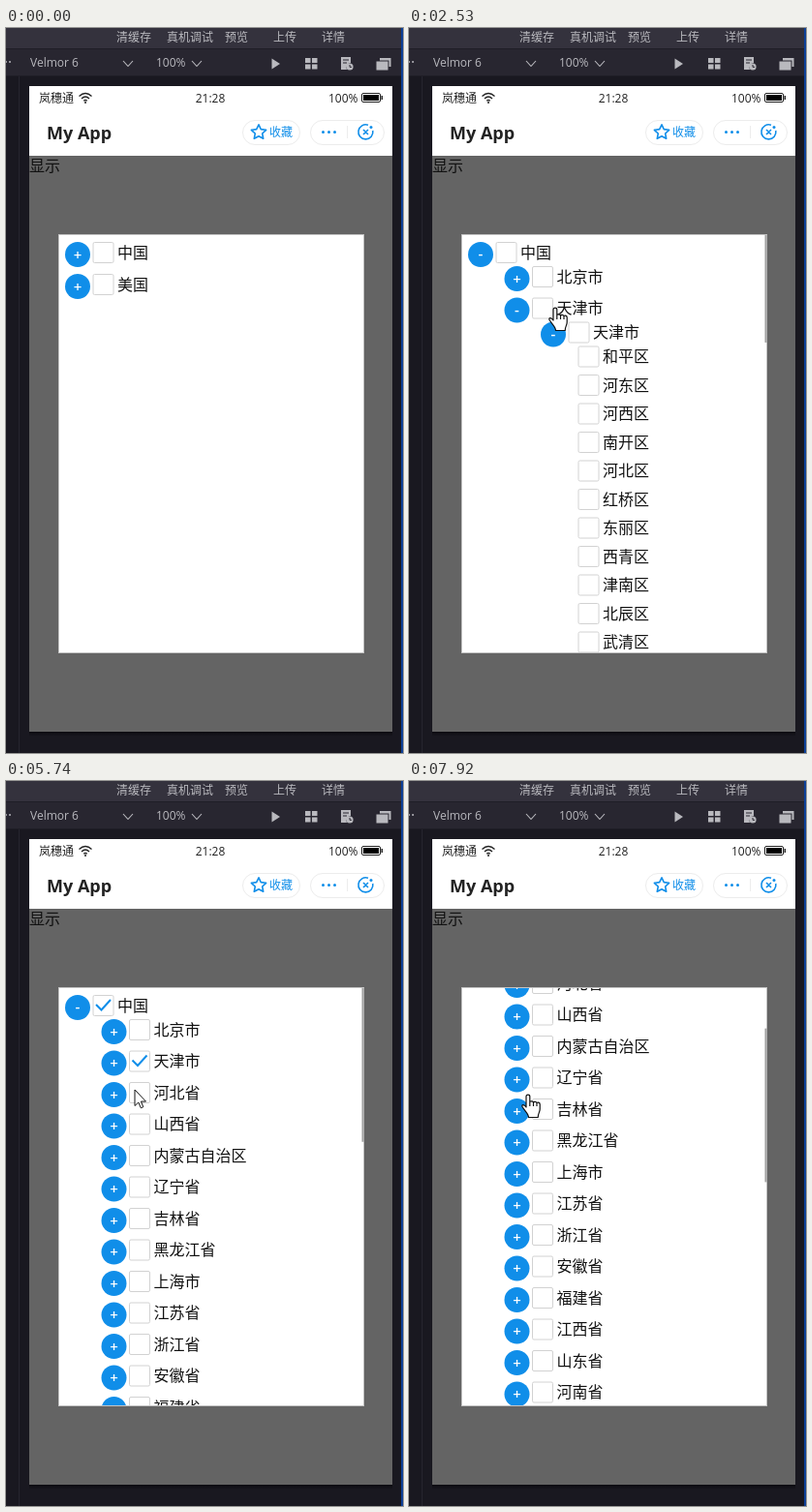
Animation, 410 px wide and 749 px high, one loop 7990 ms. Source, as an HTML page:

```html
<!DOCTYPE html>
<html lang="zh-CN">
<head>
<meta charset="utf-8">
<title>My App</title>
<style>
html, body { margin: 0; width: 100%; height: 100%; overflow: hidden; background: #191820; }
svg { display: block; width: 410px; height: 749px; }
text { font-family: "Open Sans", "Noto Sans CJK SC", "Noto Sans CJK", sans-serif; font-size: 12px; white-space: pre; }
.bar { fill: #b9b9be; }
.label { font-size: 16px; fill: #111; }
.title { font-size: 18px; font-weight: 700; }
.sign { font-size: 15px; font-weight: 600; fill: #fff; text-anchor: middle; }
.line { fill: none; stroke: #108ee9; stroke-width: 1.6; }
.chev { fill: none; stroke: #b9b9be; stroke-width: 1.1; }
</style>
</head>
<body>
<svg viewBox="0 0 410 749">
  <defs>
    <clipPath id="inside"><rect x="55" y="214" width="314" height="431"/></clipPath>
    <linearGradient id="shade" x2="0" y2="1">
      <stop stop-color="#0c0b10"/><stop offset="1" stop-color="#191820"/>
    </linearGradient>
  </defs>
  <rect width="410" height="749" fill="#191820"/>
  <rect width="410" height="21" fill="#34323d"/>
  <rect y="21" width="410" height="28" fill="#282630"/>
  <path d="M0 21.5H410M0 49.5H410" stroke="#1f1e26"/>
  <path d="M13.5 50V749" stroke="#26252e"/>
  <rect x="408" width="2" height="749" fill="#0c3f96"/>
  <g class="bar">
    <text x="114" y="14">清缓存</text><text x="166" y="14">真机调试</text>
    <text x="226" y="14">预览</text><text x="276" y="14">上传</text><text x="326" y="14">详情</text>
    <text x="25" y="40">Velmor 6</text><text x="155" y="40">100%</text>
    <circle cx="0" cy="35" r="1"/><circle cx="4" cy="35" r="1"/>
    <path d="M274.5 31.5L283 37L274.5 42.5Z"/>
    <path d="M309 31h5.5v5h-5.500zM316 31h5.5v5h-5.500zM309 37.500h5.500v5h-5.500zM316 37.500h5.500v5h-5.500z"/>
    <path d="M346 30h10v6a5 5 0 0 0-4 7h-6z"/>
    <circle cx="355" cy="40" r="3.6"/>
    <path d="M386 31h11.5v9h-2v-6.500h-9.500z"/><rect x="382.5" y="34.5" width="12" height="9"/>
  </g>
  <path d="M348 33h6M348 36h4M355 38v2.300h2" stroke="#282630" fill="none"/>
  <path class="chev" d="M121 34l5 5.5 5-5.500M192 34l5 5.500 5-5.500"/>

  <rect x="24" y="727" width="375" height="5" fill="url(#shade)"/>
  <rect x="24" y="60" width="375" height="667" fill="#646464"/>
  <rect x="24" y="60" width="375" height="72" fill="#fff"/>
  <g fill="#222">
    <text x="34" y="77">岚穗通</text>
    <text x="211" y="77" text-anchor="middle">21:28</text>
    <text x="333" y="77">100%</text>
    <path d="M75.500 70.500q6.500-6 13 0M78 73q4-4 8 0M80.300 75.300q1.700-1.700 3.400 0" fill="none" stroke="#222" stroke-width="1.3"/>
    <circle cx="82" cy="77" r="1"/>
    <rect x="367.5" y="67.5" width="19" height="9" rx="1.5" fill="none" stroke="#222"/>
    <rect x="369" y="69" width="16" height="6" fill="#000"/>
    <rect x="387.5" y="70" width="1.5" height="4"/>
    <text class="title" x="42" y="115">My App</text>
  </g>
  <g fill="none" stroke="#ececec">
    <rect x="244.5" y="95.5" width="59" height="25" rx="12.5"/>
    <rect x="314.5" y="95.5" width="76" height="25" rx="12.5"/>
    <path d="M352.5 101v13"/>
  </g>
  <path class="line" id="star" stroke-linejoin="round"/>
  <text x="272" y="112" fill="#108ee9">收藏</text>
  <g fill="#108ee9">
    <circle cx="327.5" cy="107.5" r="1.5"/><circle cx="333.5" cy="107.5" r="1.5"/><circle cx="339.5" cy="107.5" r="1.5"/>
    <circle cx="377" cy="102.5" r="1.5"/>
  </g>
  <path class="line" d="M374 100.300a7.500 7.500 0 1 0 4.800 5.700M369 105l5 5M374 105l-5 5"/>
  <text class="label" x="24" y="148">显示</text>

  <rect x="54.5" y="213.5" width="315" height="432" fill="#fff" stroke="#c4c4c4"/>
  <g clip-path="url(#inside)"><g id="tree"></g></g>
  <rect id="thumb" x="367.5" width="2" fill="#a2a2a2"/>
  <g id="cursor">
    <g id="click">
      <circle r="15.5" fill="#e3e5e4" stroke="#c9ced5"/><circle r="12" fill="#e7eb70"/>
    </g>
    <path id="hand" fill="#fff" stroke="#111" stroke-width="1.2" stroke-linejoin="round" transform="translate(0 -1)"
      d="M-2 13V2a1.900 1.900 0 0 1 3.800 0V8c0-1.600 3.600-1.600 3.700.3c.2-1.400 3.400-1.300 3.500.6c.2-1.300 3.200-1 3.200 1.200V15c0 3-2 4.500-2 8.500H.5C.5 20-3 17.500-6 12.500c-.9-2 1.600-3 4 .5zM1.800 8v4M5.500 8.500V12M9 9v3"/>
    <path id="arrow" fill="#fff" stroke="#111" d="M0 0V16.5L3.800 13L6.300 18.800L8.800 17.700L6.400 12.100H11.500Z"/>
  </g>
</svg>
<script>
const LOOP = 7990, START = 300, TICK = 76.95;
const TOP = 214, VIEW = 431, NODE = 32.5, LEAF = 29.5, HEAD = 25;
const BLUE = '#108ee9', FADED = '#7d95ae';
const $ = id => document.getElementById(id);

const provinces = '北京市 天津市 河北省 山西省 内蒙古自治区 辽宁省 吉林省 黑龙江省 上海市 江苏省 浙江省 安徽省 福建省 江西省 山东省 河南省 湖北省 湖南省'.split(' ');
const districts = '和平区 河东区 河西区 南开区 河北区 红桥区 东丽区 西青区 津南区 北辰区 武清区 宝坻区'.split(' ');

$('star').setAttribute('d', 'M' + Array.from({ length: 10 }, (_, i) => {
  const r = i % 2 ? 3.9 : 8, a = i * Math.PI / 5;
  return [261 + r * Math.sin(a), 107.8 - r * Math.cos(a)];
}).join('L') + 'Z');

function row(name, level, y, sign, ticked, tickColor = BLUE) {
  const x = 100.5 + (level < 3 ? level * 37.5 : 85);
  const knob = sign ? `<circle cx="${x - 26.5}" cy="${y + 2}" r="13" fill="${BLUE}"/>
    <text class="sign" x="${x - 26.5}" y="${y + (sign === '-' ? 6 : 7.5)}">${sign}</text>` : '';
  const tick = ticked ? `<path d="M${x - 7.5} ${y - 1}l5.5 5.5 9.5-10.5" fill="none" stroke="${tickColor}" stroke-width="2"/>` : '';
  return `${knob}<rect x="${x - 10.5}" y="${y - 10.5}" width="21" height="21" rx="1.5" fill="#fff" stroke="#d2d2d2"/>
    ${tick}<text class="label" x="${x + 14.5}" y="${y + 5.5}">${name}</text>`;
}

function country(expanded, ticked) {
  const first = 232 + HEAD;
  let html = row('中国', 0, 232, '-', ticked);
  provinces.slice(0, expanded ? 2 : provinces.length).forEach((name, i) => {
    const chosen = name === '天津市';
    html += row(name, 1, first + i * NODE, chosen && expanded ? '-' : '+', chosen && ticked);
  });
  if (expanded) {
    const y = first + NODE + HEAD;
    html += row('天津市', 2, y, '-', ticked);
    districts.forEach((name, i) => {
      html += row(name, 3, y + HEAD + i * LEAF, '', ticked, i ? BLUE : FADED);
    });
  }
  return html;
}

const closed = row('中国', 0, 232, '+') + row('美国', 0, 265, '+');
const shortList = 36 * NODE, longList = shortList + NODE + 16 * LEAF;

// each state after the first begins with a click
const states = [
  [0, closed, VIEW],
  [1800, country(true, false), longList],
  [3230, country(true, true), longList],
  [5330, country(false, true), shortList]
].map(([start, html, height]) => {
  const g = document.createElementNS('http://www.w3.org/2000/svg', 'g');
  g.innerHTML = html;
  $('tree').append(g);
  return { start, g, height };
});

// places the pointer goes to: start, arrival, x, y
const moves = [
  [300, 1500, 69, 227],
  [1900, 2250, 160, 314],
  [2300, 2520, 151, 290],
  [2600, 3020, 175, 315],
  [3240, 3800, 167, 325],
  [3850, 4100, 164, 372],
  [4150, 5050, 115, 290],
  [5340, 5740, 134, 320],
  [6650, 6910, 137, 324],
  [7500, 7900, 123, 325]
];

const ease = (t, a, b) => {
  const f = Math.min(1, Math.max(0, (t - a) / (b - a)));
  return f * f * (3 - 2 * f);
};
const pointer = t => moves.reduce(([x, y], [from, to, nx, ny]) => {
  const f = ease(t, from, to);
  return [x + (nx - x) * f, y + (ny - y) * f];
}, [350, 732]);
const scrollTop = t => 36 * ease(t, 7080, 7370) + 77 * ease(t, 7430, 7920);
const show = (el, on) => el.style.display = on ? '' : 'none';

function draw(now) {
  const raw = now % LOOP;
  const t = raw < START ? 0 : START + Math.floor((raw - START + 5) / TICK) * TICK;
  const state = states.filter(s => s.start <= t).pop();
  states.forEach(s => show(s.g, s === state));

  const top = scrollTop(t), ratio = VIEW / state.height;
  $('tree').setAttribute('transform', `translate(0 ${-top})`);
  $('thumb').setAttribute('y', TOP + top * ratio);
  $('thumb').setAttribute('height', VIEW * ratio);
  show($('thumb'), ratio < 1);

  const [x, y] = pointer(t).map(Math.round);
  const hand = t > 1300 && t < 5480 || t > 7650;
  $('cursor').setAttribute('transform', `translate(${x} ${y})`);
  show($('cursor'), t >= START);
  show($('hand'), hand);
  show($('arrow'), !hand);
  show($('click'), states.some(s => t < s.start && t > s.start - 220));
}

const begin = performance.now();
function loop() {
  draw(performance.now() - begin);
  requestAnimationFrame(loop);
}
loop();
</script>
</body>
</html>
```
